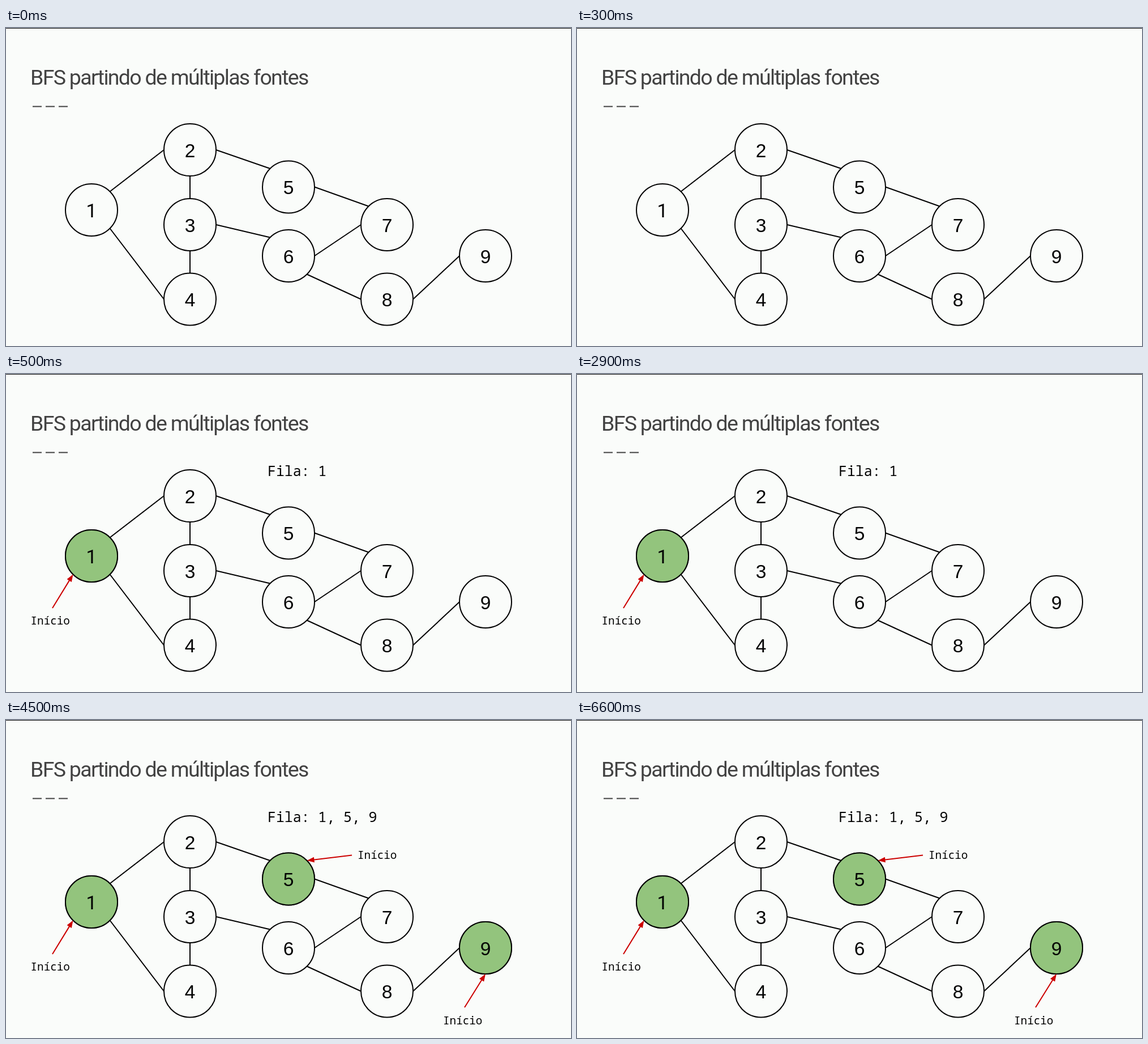
Animation of 998x561 px, one loop 8 s. Source, as an HTML page:

```html
<!DOCTYPE html>
<html lang="pt">
<head>
<meta charset="utf-8">
<title>BFS</title>
<style>
  html, body { margin: 0; width: 100%; height: 100%; overflow: hidden; background: #fafcfa; }
  svg { display: block; width: 998px; height: 561px; }
  .title { font: 37.5px Roboto, sans-serif; letter-spacing: -1.7px; fill: #424242; }
  .digit { font: 33.5px "Liberation Sans", Arial, sans-serif; text-anchor: middle; }
  .plain { font-family: Roboto, sans-serif; }
  .queue { font: 24.8px "Noto Sans Mono", monospace; white-space: pre; }
  .label { font: 19.3px "Noto Sans Mono", monospace; }
  .line { stroke: #000; stroke-width: 2; fill: none; }
  .node { stroke: #000; stroke-width: 2; fill: #fafcfa; }
  .arrow { stroke: #c00; stroke-width: 2; }
  .head { fill: #c00; }
</style>
</head>
<body>
<svg viewBox="0 0 998 561">
  <path d="M0 .5H998" stroke="#111"/>
  <text class="title" x="43" y="100">BFS partindo de múltiplas fontes</text>
  <path d="M47 138.5h16M70 138.5h16M93 138.5h16" stroke="#424242" stroke-width="2"/>
  <g id="graph"></g>
</svg>
<script>
const LOOP = 8000;
const R = 46, D = 32.5;
const nodes = [[151, 321], [325, 215], [325, 347], [325, 478.5], [499, 280.5],
               [499, 402], [673, 347], [673, 478.5], [847, 402]];
// Edges join anchor points: compass letters on each circle.
const anchors = { n: [0, -R], s: [0, R], e: [R, 0], w: [-R, 0],
                  ne: [D, -D], se: [D, D], nw: [-D, -D], sw: [-D, D] };
const edges = ["1ne-2w", "1se-4w", "2s-3n", "3s-4n", "2e-5nw", "5e-7nw",
               "3e-6nw", "6e-7w", "6se-8w", "8e-9w"];
// Node, anchor, arrow tail, label position, time of appearance
const starts = [
  { node: 1, at: "sw", tail: [82, 413], label: [43.5, 442], from: 500 },
  { node: 5, at: "ne", tail: [611, 238.5], label: [621, 245], from: 4500 },
  { node: 9, at: "s", tail: [810, 507], label: [772, 536.5], from: 4500 },
];
const graph = document.getElementById("graph");

function add(name, attrs, text = "", parent = graph) {
  const el = document.createElementNS("http://www.w3.org/2000/svg", name);
  for (const key in attrs) el.setAttribute(key, attrs[key]);
  el.textContent = text;
  return parent.appendChild(el);
}

function anchor(id, side) {
  const [x, y] = nodes[id - 1], [dx, dy] = anchors[side];
  return [x + dx, y + dy];
}

function arrow([x1, y1], [x2, y2], parent) {
  const angle = Math.atan2(y2 - y1, x2 - x1) * 180 / Math.PI;
  const length = Math.hypot(x2 - x1, y2 - y1);
  const g = add("g", { transform: `translate(${x2} ${y2}) rotate(${angle})` }, "", parent);
  add("path", { class: "arrow", d: `M${-length} 0H-11` }, "", g);
  add("path", { class: "head", d: "M0 0L-13 -4.8V4.8Z" }, "", g);
}

// Hard cut: shown only for from <= time < to.
const timed = [];
function during(el, from, to = LOOP) {
  timed.push({ el, from, to });
  return el;
}

for (const edge of edges) {
  const [a, b] = edge.split("-").map(end => anchor(end[0], end.slice(1)));
  add("path", { class: "line", d: `M${a}L${b}` });
}

nodes.forEach(([cx, cy], i) => {
  const id = i + 1;
  add("circle", { class: "node", cx, cy, r: R });
  const start = starts.find(s => s.node === id);
  if (start) {
    const g = during(add("g", {}), start.from);
    add("circle", { class: "node", cx, cy, r: R, style: "fill:#93c47d" }, "", g);
    arrow(start.tail, anchor(id, start.at), g);
    add("text", { class: "label", x: start.label[0], y: start.label[1] }, "Início", g);
  }
  add("text", { class: id === 1 ? "digit plain" : "digit", x: cx, y: cy + 12.5 }, id);
});

during(add("text", { class: "queue", x: 462, y: 180 }, "Fila: 1"), 500, 4500);
during(add("text", { class: "queue", x: 462, y: 180 }, "Fila: 1, 5, 9"), 4500);

const origin = performance.now();
function draw() {
  const time = (performance.now() - origin) % LOOP;
  for (const { el, from, to } of timed) {
    el.style.visibility = time >= from && time < to ? "visible" : "hidden";
  }
  requestAnimationFrame(draw);
}
draw();
</script>
</body>
</html>
```
